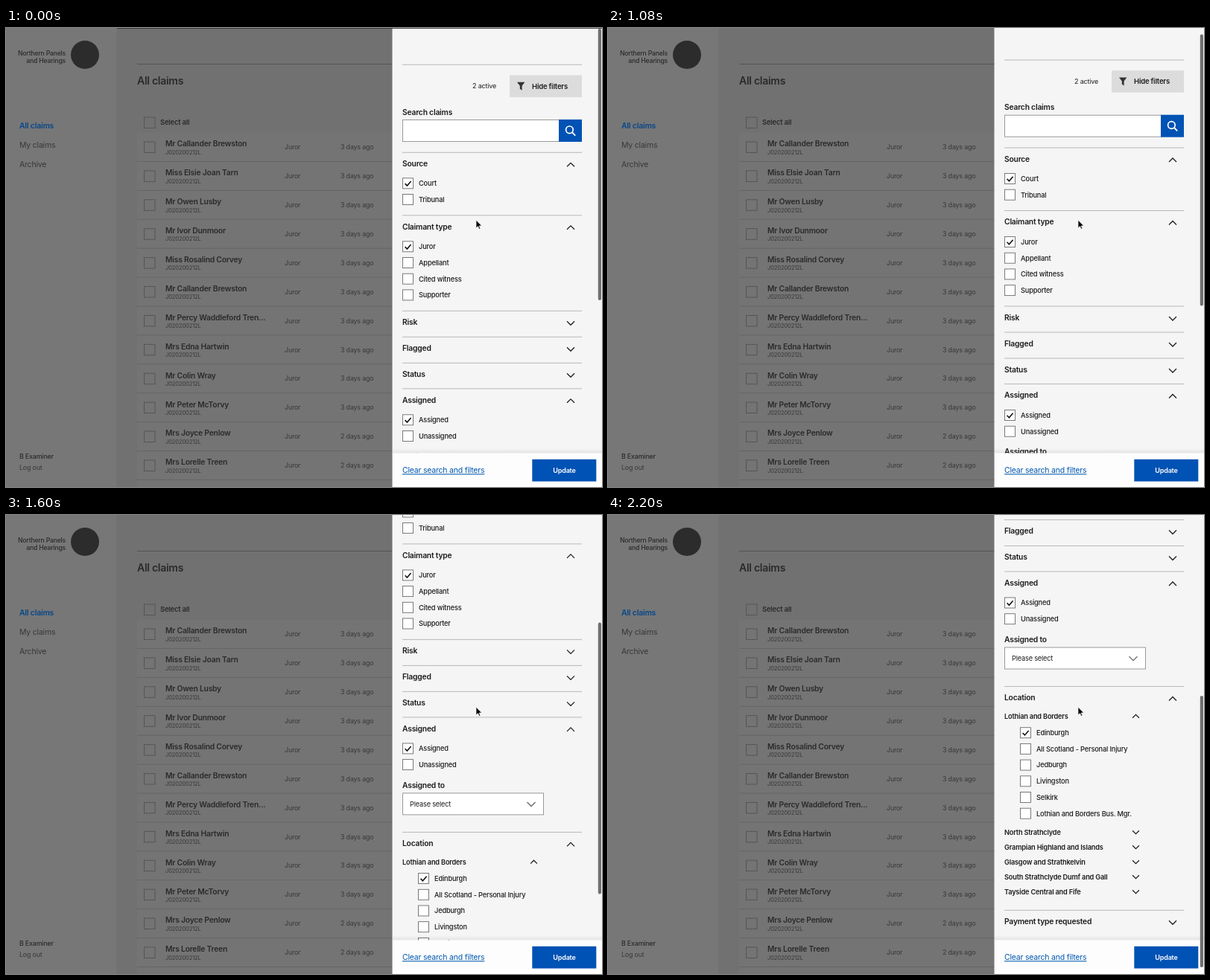
An HTML page for the animation above (2760 ms loop, 800 by 617 pixels).

```html
<!DOCTYPE html>
<html lang="en">
<head>
<meta charset="utf-8">
<title>Claims filter panel</title>
<style>
  html, body { margin: 0; width: 100%; height: 100%; overflow: hidden; background: #717171; }
  svg { display: block; width: 100%; height: 100%; }
  text { font-family: Inter, Roboto, sans-serif; letter-spacing: -.02em; white-space: pre; }
</style>
</head>
<body>
<svg id="stage" viewBox="0 0 800 617"></svg>
<script>
const LOOP = 2760, STEP = 40;
const MAX_SCROLL = 408, THUMB_TRAVEL = 242;
const INK = '#1c1c1c', DIM = '#2a2a2a', DIM_SOFT = '#383838', BLUE = '#0052b4';

// ---- drawing helpers (text is placed by its vertical centre) ----
const text = (x, y, s, size, weight = 400, fill = INK, extra = '') =>
  `<text x="${x}" y="${y + size * .36}" font-size="${size}" font-weight="${weight}" fill="${fill}" ${extra}>${s}</text>`;
const rect = (x, y, w, h, fill, extra = '') =>
  `<rect x="${x}" y="${y}" width="${w}" height="${h}" fill="${fill}" ${extra}/>`;
const stroke = (d, color = INK, width = 1.25) =>
  `<path d="${d}" fill="none" stroke="${color}" stroke-width="${width}"/>`;
const chevron = (x, y, open, r = 5, color = INK) => {
  const h = open ? r / 2 : -r / 2;
  return stroke(`M${x - r} ${y + h}L${x} ${y - h}L${x + r} ${y + h}`, color);
};
const checkbox = (x, y, checked) =>
  rect(x + .5, y - 7, 14, 14, '#fff', 'stroke="#6c6c6c" stroke-width=".9"') +
  (checked ? stroke(`M${x + 3.6} ${y + .3}l2.8 2.9l5.2-6`, '#111', 1.6) : '');
const divider = y => rect(532, y - .5, 241, 1, '#b8b8b8');
const section = (y, name, open) =>
  divider(y - 15) + text(532, y, name, 10.3, 600) + chevron(758, y + 1.5, open);
const options = (x, y, names, checked) => names.map((name, i) =>
  checkbox(x, y + i * 21.7, i === checked) +
  text(x + 22, y + i * 21.7, name, 9.25, 500)).join('');
const region = (y, name, open) =>
  text(532, y, name, 9.2, 600) + chevron(708.5, y, open, 4.4);

// ---- dimmed page ----
const claimants = [
  'Mr Callander Brewston', 'Miss Elsie Joan Tarn', 'Mr Owen Lusby', 'Mr Ivor Dunmoor',
  'Miss Rosalind Corvey', 'Mr Callander Brewston', 'Mr Percy Waddleford Tren...',
  'Mrs Edna Hartwin', 'Mr Colin Wray', 'Mr Peter McTorvy', 'Mrs Joyce Penlow', 'Mrs Lorelle Treen'
];
const dimBox = y => rect(185.5, y - 7, 14.5, 14.5, 'none', 'stroke="#525252" stroke-width=".9"');
const claimRow = (name, i) => {
  const y = 160 + i * 38.9;
  return dimBox(y) + text(214, y - 4.3, name, 10.3, 600, DIM) +
    text(214, y + 7, 'J020200212L', 7.6, 400, DIM_SOFT) +
    text(374, y, 'Juror', 8.9, 400, DIM_SOFT) +
    text(449, y, `${i < 10 ? 3 : 2} days ago`, 8.9, 400, DIM_SOFT) +
    rect(176, y + 19, 343, 1, '#656565');
};
const page =
  rect(0, 0, 800, 617, '#717171') + rect(0, 0, 148.5, 617, '#777') +
  rect(176, 140.5, 343, 477, '#747474') +
  text(80, 34, 'Northern Panels', 8.6, 500, DIM, 'text-anchor="end"') +
  text(80, 44, 'and Hearings', 8.6, 500, DIM, 'text-anchor="end"') +
  '<circle cx="106" cy="36" r="19" fill="#2c2c2c"/>' +
  text(18, 131.5, 'All claims', 10.4, 600, '#07478a') +
  text(18, 157.3, 'My claims', 10.5, 400, DIM_SOFT) +
  text(18, 183, 'Archive', 10.5, 400, DIM_SOFT) +
  text(18, 575.5, 'B Examiner', 8.9, 500, DIM) +
  text(18, 590.5, 'Log out', 8.9, 400, DIM_SOFT) +
  rect(176, 48, 343, 1, '#535353') +
  text(176, 71, 'All claims', 14, 600, DIM) +
  dimBox(127) + text(207, 127, 'Select all', 9.4, 600, DIM) +
  claimants.map(claimRow).join('');

// ---- scrolling filter list ----
const filters =
  divider(48.5) + text(626, 77.3, '2 active', 9, 400) +
  rect(676, 62.7, 97, 29.5, '#dcdcdc') +
  `<path d="M686 72h10.4l-3.8 5v6l-2.8-2v-4z" fill="#333"/>` +
  text(706, 77.3, 'Hide filters', 9.5, 600) +
  text(532, 112, 'Search claims', 10.3, 600) +
  rect(532.5, 122.7, 210, 29, '#fff', 'stroke="#999"') +
  rect(742, 122.2, 31, 30, BLUE) +
  '<circle cx="756.4" cy="136" r="4.8" fill="none" stroke="#fff" stroke-width="1.7"/>' +
  stroke('M759.8 139.4l4.4 4.4', '#fff', 1.9) +
  section(181.5, 'Source', true) + options(532, 208, ['Court', 'Tribunal'], 0) +
  section(266, 'Claimant type', true) +
  options(532, 293, ['Juror', 'Appellant', 'Cited witness', 'Supporter'], 0) +
  section(394.5, 'Risk') + section(429.5, 'Flagged') + section(464.5, 'Status') +
  section(499, 'Assigned', true) + options(532, 526, ['Assigned', 'Unassigned'], 0) +
  text(532, 575, 'Assigned to', 10.3, 600) +
  rect(532.5, 586, 189, 29, '#fff', 'stroke="#999" id="select"') +
  text(542, 600.7, 'Please select', 9.2, 400) + chevron(705, 600.9, false, 5.5, '#666') +
  section(653.5, 'Location', true) + region(678.5, 'Lothian and Borders', true) +
  options(553, 700.7, ['Edinburgh', 'All Scotland - Personal Injury', 'Jedburgh',
    'Livingston', 'Selkirk', 'Lothian and Borders Bus. Mgr.'], 0) +
  ['North Strathclyde', 'Grampian Highland and Islands', 'Glasgow and Strathkelvin',
    'South Strathclyde Dumf and Gall', 'Tayside Central and Fife']
    .map((name, i) => region(834.5 + i * 20, name)).join('') +
  section(954.3, 'Payment type requested');

const footer =
  rect(519, 565, 281, 6.5, 'url(#lift)') + rect(519, 571.5, 281, 46, '#fdfdfd') +
  text(532, 594.5, 'Clear search and filters', 10.5, 400, '#0058b0', 'text-decoration="underline"') +
  rect(706.3, 579.8, 86, 29.7, BLUE) +
  text(749.5, 595, 'Update', 9, 600, '#fff', 'text-anchor="middle"');

document.getElementById('stage').innerHTML =
  `<defs><linearGradient id="lift" x2="0" y2="1"><stop stop-opacity="0"/><stop offset="1" stop-opacity=".07"/></linearGradient></defs>` +
  page + rect(518.5, 0, 282, 617, '#f5f5f5') + `<g id="list">${filters}</g>` + footer +
  rect(149, 0, 651, 0, '#2a2a2a', 'id="gap"') +
  rect(794.8, 1, 4.2, 365, '#6f6f6f', 'rx="2.1" id="thumb"') +
  `<path d="M631 258.3v10.6l2.5-2.3 1.6 3.7 1.7-.7-1.6-3.6h3.4z" fill="#000" stroke="#fff" stroke-width=".7"/>`;

// ---- motion ----
// [time, scroll position, velocity per ms], joined by cubic Hermite curves
const keys = [
  [0, -.8, .006], [200, 0, 0], [980, 0, 0], [1080, 5.5, .16], [1440, 121, .43],
  [1720, 310.5, .93], [1920, 393.5, .14], [2200, MAX_SCROLL, 0]
];
function scrollAt(t) {
  const i = keys.findIndex(key => key[0] > t);
  if (i < 0) return MAX_SCROLL;
  const [t0, s0, v0] = keys[i - 1], [t1, s1, v1] = keys[i];
  const span = t1 - t0, u = (t - t0) / span;
  return s0 + (s1 - s0) * u * u * (3 - 2 * u) +
    span * u * (u - 1) * (v0 * (u - 1) + v1 * u);
}
function thumbOpacity(t) {
  return t >= 1000 ? 1 : Math.max(0, Math.min(1, (800 - t) / 220));
}

const [list, select, gap, thumb] =
  ['list', 'select', 'gap', 'thumb'].map(id => document.getElementById(id));

function draw(now) {
  const t = Math.floor(now % LOOP / STEP) * STEP;
  const scroll = scrollAt(t);
  // The scrollbar runs one step ahead of the content.
  const lead = Math.max(0, scrollAt(t + STEP));
  list.setAttribute('transform', `translate(0 ${-scroll})`);
  gap.setAttribute('height', Math.max(0, -scroll));
  thumb.setAttribute('y', 1 + lead / MAX_SCROLL * THUMB_TRAVEL);
  thumb.setAttribute('opacity', thumbOpacity(t));
  select.setAttribute('fill', t >= 1720 && t < 2160 ? '#e4e4e4' : '#fff');
}

const start = performance.now();
function tick() {
  draw(performance.now() - start);
  requestAnimationFrame(tick);
}
tick();
</script>
</body>
</html>
```
